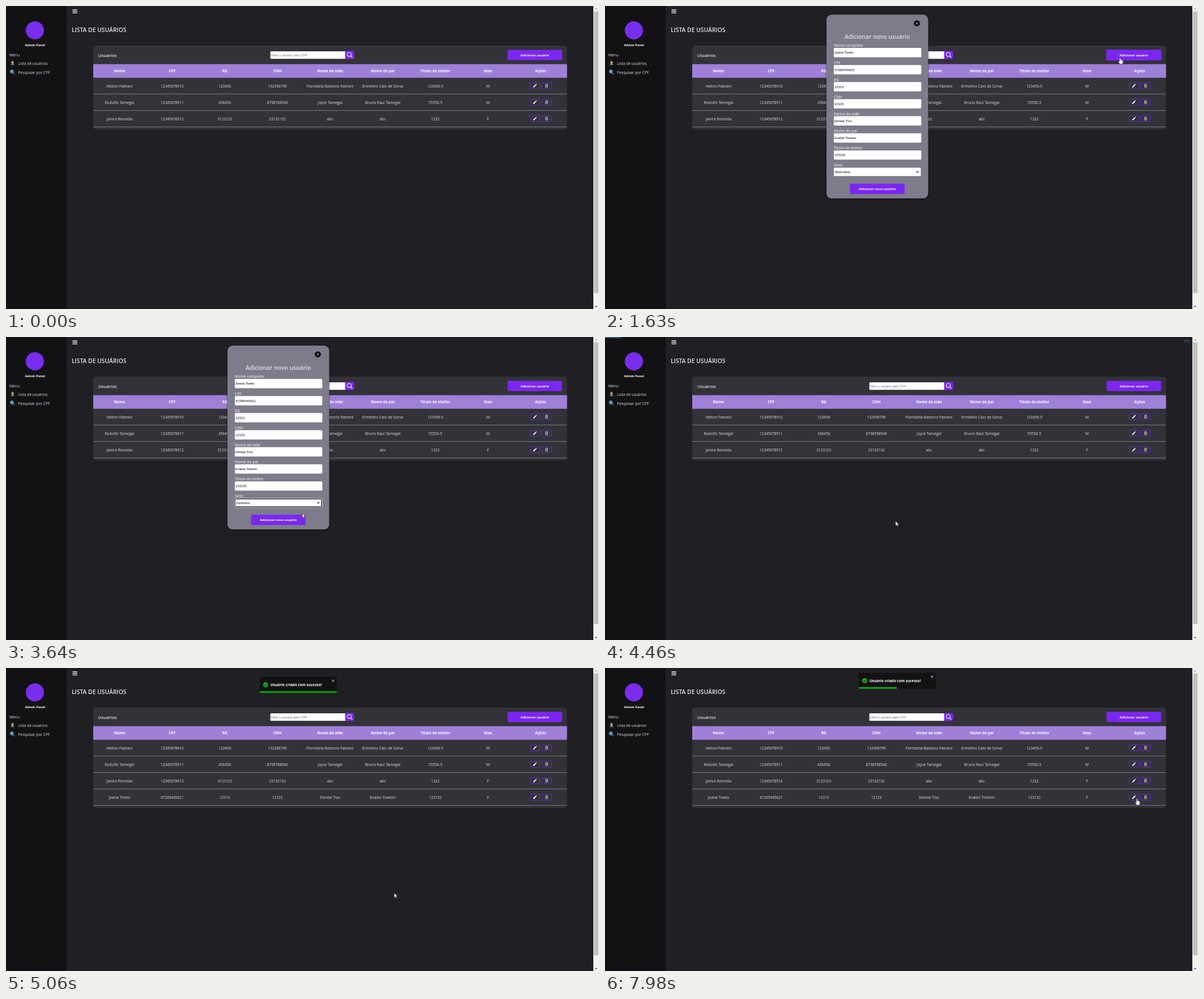
An HTML page that plays this animation: 1047x535 px, repeating every 8 s.

```html
<!DOCTYPE html>
<html lang="pt">
<head>
<meta charset="utf-8">
<title>Admin Panel</title>
<style>
html, body { margin: 0; width: 100%; height: 100%; overflow: hidden; background: #202024; }
svg { display: block; width: 100vw; height: 100vh; }
text { font: 6.7px "Open Sans", "Noto Sans", sans-serif; fill: #e1e1e6; }
.mid { text-anchor: middle; }
.num { font-size: 6.45px; }
.head { font-weight: 700; font-size: 6.65px; fill: #fff; }
.title { font-weight: 600; font-size: 10.35px; }
.label { font-weight: 600; font-size: 6.7px; }
.btn { font-weight: 700; font-size: 5.7px; fill: #fff; text-anchor: middle; }
.field { font: 5.88px "Liberation Sans", Arial, sans-serif; fill: #000; }
.purple { fill: #7c26f6; }
.line { fill: none; stroke: #fff; stroke-linecap: round; }

/* 1% of the loop is 80 ms */
.a { animation: 8s linear infinite; }
.step { animation-timing-function: step-end; }

#modal { animation-name: modal; filter: drop-shadow(0 1px 1.5px rgba(0,0,0,.65)); }
@keyframes modal { 0% { visibility: hidden } 19.6% { visibility: visible } 54.85%, 100% { visibility: hidden } }
#addHover { animation-name: addHover; }
@keyframes addHover { 0% { visibility: hidden } 16.1% { visibility: visible } 21.5%, 100% { visibility: hidden } }

#popup { animation-name: popup; }
@keyframes popup { 0% { visibility: hidden } 36.75% { visibility: visible } 45.45%, 100% { visibility: hidden } }
#mark { animation-name: mark; }
@keyframes mark { 0% { transform: none } 40%, 100% { transform: translateY(9px) } }
#opt1 { animation-name: opt1; }
@keyframes opt1 { 0% { fill: #fff } 40%, 100% { fill: #000 } }
#opt2 { animation-name: opt2; }
@keyframes opt2 { 0% { fill: #000 } 40%, 100% { fill: #fff } }
#before { animation-name: before; }
@keyframes before { 0% { visibility: hidden } 19.6% { visibility: visible } 45.45%, 100% { visibility: hidden } }
#after { animation-name: after; }
@keyframes after { 0% { visibility: hidden } 45.45% { visibility: visible } 54.85%, 100% { visibility: hidden } }

#newRow, #short { visibility: hidden; }
#newRow { animation-name: newRow; }
@keyframes newRow { 0% { visibility: hidden } 58.6%, 100% { visibility: visible } }
#cardEnd { animation-name: cardEnd; }
@keyframes cardEnd { 0% { height: 148px } 58.6%, 100% { height: 177px } }

#loading { animation-name: loading; }
@keyframes loading { 0% { visibility: hidden } 54.85% { visibility: visible } 59.8%, 100% { visibility: hidden } }
#bar { animation-name: bar; }
@keyframes bar {
  0%, 54.85% { transform: scaleX(0) } 55.6%, 56% { transform: scaleX(.028) }
  57.5% { transform: scaleX(.35) } 58.8%, 100% { transform: none }
}
#spin { animation: spin .4s linear infinite; }
@keyframes spin { to { transform: rotate(360deg) } }

#toast { animation-name: toast; animation-timing-function: cubic-bezier(.215,.61,.355,1); }
@keyframes toast {
  0%, 57.85% { transform: translateY(-1635px) }
  63.1% { transform: translateY(13.6px) } 64.41% { transform: translateY(-5.4px) }
  65.73% { transform: translateY(2.7px) } 66.6%, 100% { transform: none }
}
#timer { transform-box: fill-box; transform-origin: 0 0; animation-name: timer; }
@keyframes timer { 0%, 67.41% { transform: none } 100% { transform: scaleX(.492) } }

#cursor { animation-name: cursor; }
@keyframes cursor {
  0% { transform: translate(1034px,540px) }
  5.7% { transform: translate(1034px,533px); animation-timing-function: cubic-bezier(.3,.25,.45,1) }
  15.25% { transform: translate(908.5px,97px) }
  16.1%, 20.5% { transform: translate(909.5px,91px); animation-timing-function: ease-in }
  24.4% { transform: translate(770px,262px) }
  27.5% { transform: translate(560px,346px) }
  29% { transform: translate(538px,316px); animation-timing-function: ease-out }
  32.5% { transform: translate(512px,298px) }
  37.6%, 42.9% { transform: translate(508px,296px) }
  43.75% { transform: translate(516px,298.5px) }
  45.4%, 45.7% { transform: translate(523px,311px) }
  48.75% { transform: translate(514px,326px) }
  52.4%, 55.9% { transform: translate(513px,325px); animation-timing-function: ease-in-out }
  63.2%, 74.8% { transform: translate(685.3px,397px) }
  76.4% { transform: translate(693px,393.7px) }
  85.1% { transform: translate(879px,309px); animation-timing-function: ease-out }
  95.2%, 100% { transform: translate(939.3px,230.5px) }
}
#arrow { animation-name: arrow; }
@keyframes arrow {
  0% { visibility: visible } 16.1% { visibility: hidden } 21.5% { visibility: visible }
  47.4% { visibility: hidden } 54.85% { visibility: visible } 94.5%, 100% { visibility: hidden }
}
#hand { animation-name: hand; }
@keyframes hand {
  0% { visibility: hidden } 16.1% { visibility: visible } 21.5% { visibility: hidden }
  47.4% { visibility: visible } 54.85% { visibility: hidden } 94.5%, 100% { visibility: visible }
}
</style>
</head>
<body>
<svg viewBox="0 0 1047 535" preserveAspectRatio="none">
  <defs>
    <g id="actions">
      <g fill="none" stroke="#6f2bd6" stroke-width=".9">
        <rect x="-18.6" y="-5.5" width="17" height="11" rx="1.5"/>
        <rect x="1.9" y="-5.5" width="17" height="11" rx="1.5"/>
      </g>
      <path fill="#fff" transform="translate(-14.4 -4.4) scale(.36)" d="M3 17.2V21h3.8L17.8 9.9l-3.7-3.7zM20.7 7a1 1 0 0 0 0-1.4l-2.3-2.3a1 1 0 0 0-1.4 0l-1.9 1.8 3.8 3.8z"/>
      <path fill="none" stroke="#d0d0d6" stroke-width=".75" d="M8 -2H12.8M9.5-2.1V-3H11.3V-2.1M8.5-2V2.8H12.3V-2M9.7-.8V1.7M11.1-.8V1.7"/>
    </g>
  </defs>

  <rect width="1047" height="535" fill="#202024"/>
  <rect width="107" height="535" fill="#121214"/>
  <circle cx="51" cy="43" r="16" fill="#7a2cf0"/>
  <text class="head mid" x="51.2" y="71" style="font-size:5.63px">Admin Panel</text>
  <text x="6" y="89.3">Menu</text>
  <text x="21.3" y="103.6" style="font-size:6.63px">Lista de usuários</text>
  <text x="21.3" y="119.9" style="font-size:6.63px">Pesquisar por CPF</text>
  <path fill="#59606b" d="M7.8 104.6q0-3.4 3.7-3.4t3.7 3.4z"/>
  <path fill="#e8e8ea" d="M10.5 101.2h2l-1 2.6z"/>
  <circle cx="11.5" cy="98.9" r="2.2" fill="#e0ac72"/>
  <path fill="#5a4130" d="M9.2 98.7q0-2.6 2.3-2.6t2.3 2.6q-2.3-1.4-4.6 0z"/>
  <path stroke="#5b6670" stroke-width="1.6" stroke-linecap="round" d="M12.8 118l2.3 2.2"/>
  <circle cx="10.4" cy="115.6" r="3" fill="#4aa3dc" stroke="#6d8494" stroke-width=".9"/>

  <path stroke="#fff" stroke-width="1.3" d="M117.4 6.6h8.4M117.4 9.4h8.4M117.4 12.2h8.4"/>
  <text class="title" x="116" y="45.5">LISTA DE USUÁRIOS</text>

  <rect id="cardEnd" class="a step" x="154" y="70" width="836.5" height="148" rx="5" fill="#323238"/>
  <text class="label" x="162.7" y="89.7" style="font-size:7.75px">Usuários</text>
  <rect x="466.7" y="80" width="133" height="13.2" rx="1.5" fill="#fff"/>
  <text class="field" x="467.2" y="88.7" style="fill:#757575">Filtre o usuário pelo CPF</text>
  <path class="purple" d="M598.8 79.6h14q1.7 0 1.7 1.7v10.5q0 1.7-1.7 1.7h-14z"/>
  <circle class="line" cx="606" cy="85.6" r="3.6" stroke-width="1.1"/>
  <path class="line" stroke-width="1.2" d="M608.7 88.3l2.5 2.4"/>
  <rect class="purple" x="885.6" y="77.6" width="96.3" height="18" rx="2"/>
  <rect id="addHover" class="purple a step" x="885" y="77.2" width="97.6" height="18.8" rx="2"/>
  <text class="btn" x="933.6" y="88.7">Adicionar usuário</text>
  <rect x="154" y="102.7" width="836.5" height="24" fill="#9f80d9"/>
  <g id="table"></g>
  <g id="newRow" class="a step"></g>

  <rect x="1037" width="10" height="535" fill="#f1f1f1"/>
  <rect x="1038" y="9.5" width="8" height="497.5" fill="#c1c1c1"/>
  <path fill="#a3a3a3" d="M1039.8 6h4.4l-2.2-2.4z"/>
  <path fill="#505050" d="M1039.8 529.8h4.4l-2.2 2.4z"/>

  <g id="modal" class="a step">
    <rect x="391" y="15.3" width="179.6" height="324.5" rx="9" fill="#7c7c8a"/>
    <circle cx="550.6" cy="30.6" r="5.3" fill="#0a0a0c"/>
    <path class="line" stroke-width=".8" d="M549 29l3.2 3.2M552.2 29l-3.2 3.2"/>
    <text class="title mid" x="480.7" y="57.7">Adicionar novo usuário</text>
    <g id="form"></g>
    <text class="label" x="404" y="283.4">Sexo</text>
    <rect x="404" y="285.6" width="153.6" height="14.6" rx="1.5" fill="#fff"/>
    <text id="before" class="field a step" x="406.6" y="295">Masculino</text>
    <g id="after" class="a step">
      <rect x="403.4" y="284.9" width="154.8" height="16" rx="2" fill="none" stroke="#fff" stroke-width=".8"/>
      <rect x="404.4" y="285.9" width="152.8" height="14" rx="1.5" fill="#fff" stroke="#101010" stroke-width="1.1"/>
      <text class="field" x="406.6" y="295">Feminino</text>
    </g>
    <path fill="none" stroke="#111" stroke-width="1.1" d="M549.6 291.7l2 2.1 2-2.1"/>
    <rect class="purple" x="432.5" y="313.8" width="96.5" height="18.2" rx="2"/>
    <text class="btn" x="480.7" y="325">Adicionar novo usuário</text>
    <g id="popup" class="a step">
      <rect x="404.4" y="301" width="152.6" height="19" fill="#fff" stroke="#767676" stroke-width=".6"/>
      <rect id="mark" class="a step" x="404.7" y="301.5" width="152" height="9" fill="#1e78e0"/>
      <text id="opt1" class="field a step" x="406.6" y="308.2">Masculino</text>
      <text id="opt2" class="field a step" x="406.6" y="317.2">Feminino</text>
    </g>
  </g>

  <g id="loading" class="a step">
    <rect id="bar" class="a" width="1037" height="1.1" fill="#29d"/>
    <g transform="translate(1026.8 9.4)">
      <path id="spin" fill="none" stroke="#29d" stroke-width="1" d="M-2.7 2.7A3.8 3.8 0 0 1 2.7-2.7"/>
    </g>
  </g>

  <g id="toast" class="a">
    <rect x="448" y="8.5" width="136" height="28" fill="#121212"/>
    <circle cx="458.4" cy="22.4" r="4.4" fill="#07bc0c"/>
    <path fill="none" stroke="#121212" stroke-width="1.1" d="M456.2 22.5l1.6 1.6 2.9-3.2"/>
    <text class="head" x="467" y="24.7" style="font-size:6.45px">Usuário criado com sucesso!</text>
    <path class="line" stroke-width=".9" d="M575.9 13.6l3.4 3.4M579.3 13.6l-3.4 3.4"/>
    <rect id="timer" class="a" x="448" y="33.9" width="136" height="2.6" fill="#07bc0c"/>
  </g>

  <g id="cursor" class="a" stroke="#111" stroke-width=".6" stroke-linejoin="round" fill="#fff">
    <path id="arrow" class="a step" d="M0 0V8.4L1.9 6.7 3.2 9.8 4.6 9.2 3.3 6.2H5.9Z"/>
    <path id="hand" class="a step" d="M-1.1 1Q-1.1 0 0 0T1 1V4Q2.1 3.4 2.6 4.4 3.7 3.9 4.1 5 5.2 4.7 5.2 6V8.2Q5 10 4 11.6H-.8Q-1.4 9.8-3.3 7.3-3.7 6-2.3 6L-1.1 7Z"/>
  </g>
</svg>
<script>
const NS = "http://www.w3.org/2000/svg";
const table = document.getElementById("table");
const newRow = document.getElementById("newRow");
const form = document.getElementById("form");

function add(parent, tag, attrs, content = "") {
  const el = document.createElementNS(NS, tag);
  for (const key in attrs) el.setAttribute(key, attrs[key]);
  el.textContent = content;
  parent.append(el);
}

const columnX = i => 200.4 + i * 92.95;
const heads = ["Nome", "CPF", "RG", "CNH", "Nome da mãe", "Nome do pai", "Título de eleitor", "Sexo", "Ações"];
const rows = [
  ["Helton Fabrani", "12345678910", "123456", "132456799", "Florisbela Bastono Fabrani", "Ermelino Caio de Sorva", "123456-5", "M"],
  ["Rodolfo Tamegal", "12345678911", "456456", "8798788546", "Joyce Tamegal", "Bruno Raul Tamegal", "55556-5", "M"],
  ["Janice Renolda", "12345678912", "3123123", "23132132", "abc", "abc", "1232", "F"],
  ["Joana Tiveto", "47265445621", "12313", "12123", "Denise Tivo", "Evaldo Tivetori", "123132", "F"]
];

heads.forEach((name, i) => add(table, "text", { class: "head mid", x: columnX(i), y: 117 }, name));

rows.forEach((cells, r) => {
  const group = r < 3 ? table : newRow;
  const top = r * 29.1;
  cells.forEach((value, i) => {
    const kind = /\d/.test(value) ? "mid num" : "mid";
    add(group, "text", { class: kind, x: columnX(i), y: 143.5 + top }, value);
  });
  add(group, "use", { href: "#actions", x: 944.1, y: 140.7 + top });
  add(group, "rect", { x: 154, y: 154.9 + top, width: 836.5, height: 0.8, fill: "#8d8d99" });
});

["Nome completo", ...heads.slice(1, 7)].forEach((name, i) => {
  const top = i * 30.13;
  add(form, "text", { class: "label", x: 404, y: 72.4 + top }, name);
  add(form, "rect", { x: 404, y: 74.1 + top, width: 154.5, height: 16.4, rx: 1.8, fill: "#fff" });
  add(form, "text", { class: "field", x: 405, y: 84.4 + top }, rows[3][i]);
});
</script>
</body>
</html>
```
